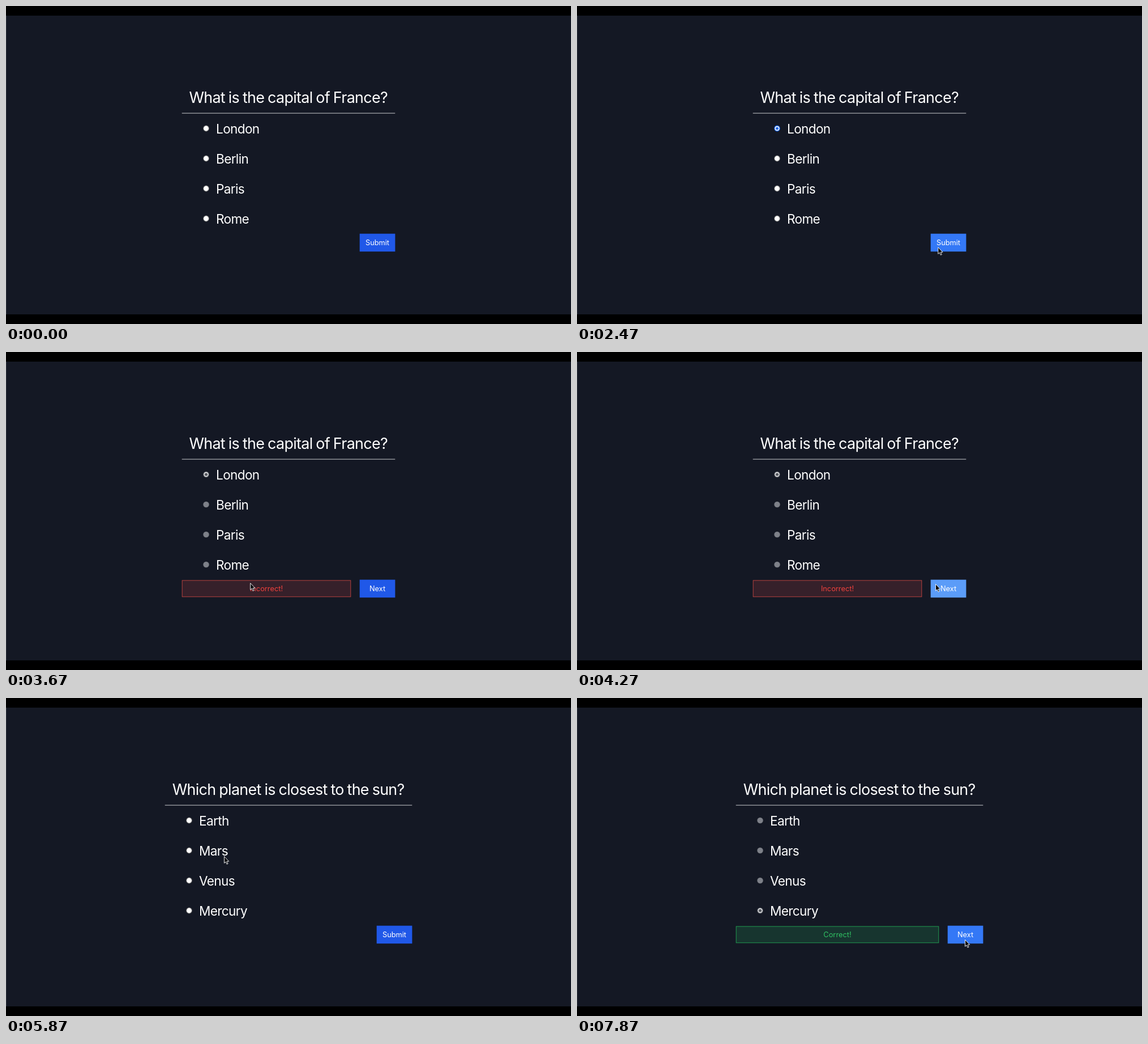
Write an HTML page that moves like this. It is 998 px wide and 561 px high and loops after 8000 ms.

```html
<!DOCTYPE html>
<html lang="en">
<head>
<meta charset="utf-8">
<title>Quiz</title>
<style>
  html, body { margin: 0; width: 100%; height: 100%; overflow: hidden; background: #000; }
  svg { display: block; width: 100%; height: 100%; }
  text { font-family: Inter, Roboto, sans-serif; font-optical-sizing: none; fill: #fff; }
  .title { font-size: 26.9px; letter-spacing: -.7px; word-spacing: -1px; text-anchor: middle; }
  .option { font-size: 22.6px; letter-spacing: -.65px; }
  .small { font-size: 12.8px; text-anchor: middle; }
</style>
</head>
<body>
<svg id="stage" viewBox="0 0 998 561"></svg>
<script>
const stage = document.getElementById('stage');
const TICKS = 120, RATE = 0.015; // 15 steps per second

const questions = [
  { title: 'What is the capital of France?', options: ['London', 'Berlin', 'Paris', 'Rome'],
    left: 311, pick: 0, press: 22, click: 39, leave: 64,
    verdict: 'Incorrect!', ink: '#ef413d', edge: '#b8423f', fill: '#36202a' },
  { title: 'Which planet is closest to the sun?', options: ['Earth', 'Mars', 'Venus', 'Mercury'],
    left: 281, pick: 3, press: 100, click: 116, leave: TICKS,
    verdict: 'Correct!', ink: '#30c263', edge: '#219b51', fill: '#17352f' }
];

// Eased pointer moves: from tick, to tick, x, y
const moves = [
  [2, 3, 636, 272], [11, 20, 404, 219], [28, 31, 612, 431], [34, 38, 642, 424],
  [46, 53, 402, 407], [53, 62, 633, 409], [77, 81, 425, 346], [83, 88, 385, 279],
  [88, 97, 371, 379], [104, 108, 429, 349], [108, 111, 682, 421], [113, 116, 685, 426]
];

function pointerAt(n) {
  let x = 627, y = 247;
  for (const [from, to, toX, toY] of moves) {
    const t = Math.min(1, Math.max(0, (n - from) / (to - from)));
    const k = t * t * (3 - 2 * t);
    x += (toX - x) * k;
    y += (toY - y) * k;
  }
  return { x, y };
}

const rect = (x, y, w, h, fill, more = '') =>
  `<rect x="${x}" y="${y}" width="${w}" height="${h}" fill="${fill}" ${more}/>`;
const label = (x, y, kind, text, fill = '#fff') =>
  `<text x="${x}" y="${y}" class="${kind}" style="fill:${fill}">${text}</text>`;
const rings = (x, y, list) =>
  list.map(([r, fill]) => `<circle cx="${x}" cy="${y}" r="${r}" fill="${fill}"/>`).join('');

function radio(x, y, checked, disabled, hover, pressed) {
  if (disabled) return rings(x, y, checked
    ? [[5.3, '#5c5f67'], [4.2, '#dedfe1'], [2.6, '#55585f']]
    : [[5.3, '#70737b'], [4.5, '#7e8189']]);
  if (checked) return rings(x, y, [[5.4, '#1c66e6'], [4, '#fff'], [2.5, '#1c66e6']]);
  return rings(x, y, [[5.4, pressed ? '#8d8d8d' : hover ? '#626262' : '#767676'], [4.4, '#fff']]);
}

function arrow({ x, y }) {
  return `<path transform="translate(${x} ${y})" d="M.5 .5V12.3L3.1 9.9L5 14.2L7 13.3L5.1 9.2H8.7Z"
    fill="#08090c" stroke="#fff" stroke-width=".9" stroke-linejoin="round"/>`;
}

function draw(n) {
  const q = questions[n < 66 ? 0 : 1], { left } = q, right = 998 - left;
  const tip = pointerAt(n), buttonX = right - 62;
  const checked = n >= q.press + 2, answered = n >= q.click + 2;
  const over = tip.x >= buttonX && tip.x < right && tip.y >= 402 && tip.y < 433;
  const active = n >= q.leave || n >= q.click && !answered;

  let out = rect(0, 17, 998, 527, '#141824') + rect(0, 17, 1, 527, '#30343d');
  out += label(498.7, 171.2, 'title', q.title);
  out += rect(left - .3, 188.7, right - left + .6, .8, '#f4f5f7');

  q.options.forEach((name, i) => {
    const y = 216 + 53 * i, x = left + 42.5, picked = i === q.pick;
    const hover = Math.abs(tip.y - y) < 18 && tip.x > x - 6 && tip.x < x + 95;
    out += radio(x, y, picked && checked, answered, hover, picked && n >= q.press);
    out += label(left + 60, y + 9.2, 'option', name);
  });

  if (answered) {
    const w = buttonX - 16 - left;
    out += rect(left + .2, 403, w - .4, 28.8, q.fill, `stroke="${q.edge}"`);
    out += label(left + w / 2, 422, 'small', q.verdict, q.ink);
  }
  out += rect(buttonX - .3, 401.7, 62.7, 31.5, active ? '#5b9cf8' : over ? '#3478f6' : '#2058e8');
  out += label(buttonX + 31, 422, 'small', answered ? 'Next' : 'Submit');
  if (n >= 2) out += arrow(tip);
  stage.innerHTML = out;
}

let last = -1;
function frame() {
  const n = Math.floor((performance.now() + 4) * RATE) % TICKS;
  if (n !== last) draw(last = n);
  requestAnimationFrame(frame);
}
frame();
</script>
</body>
</html>
```
